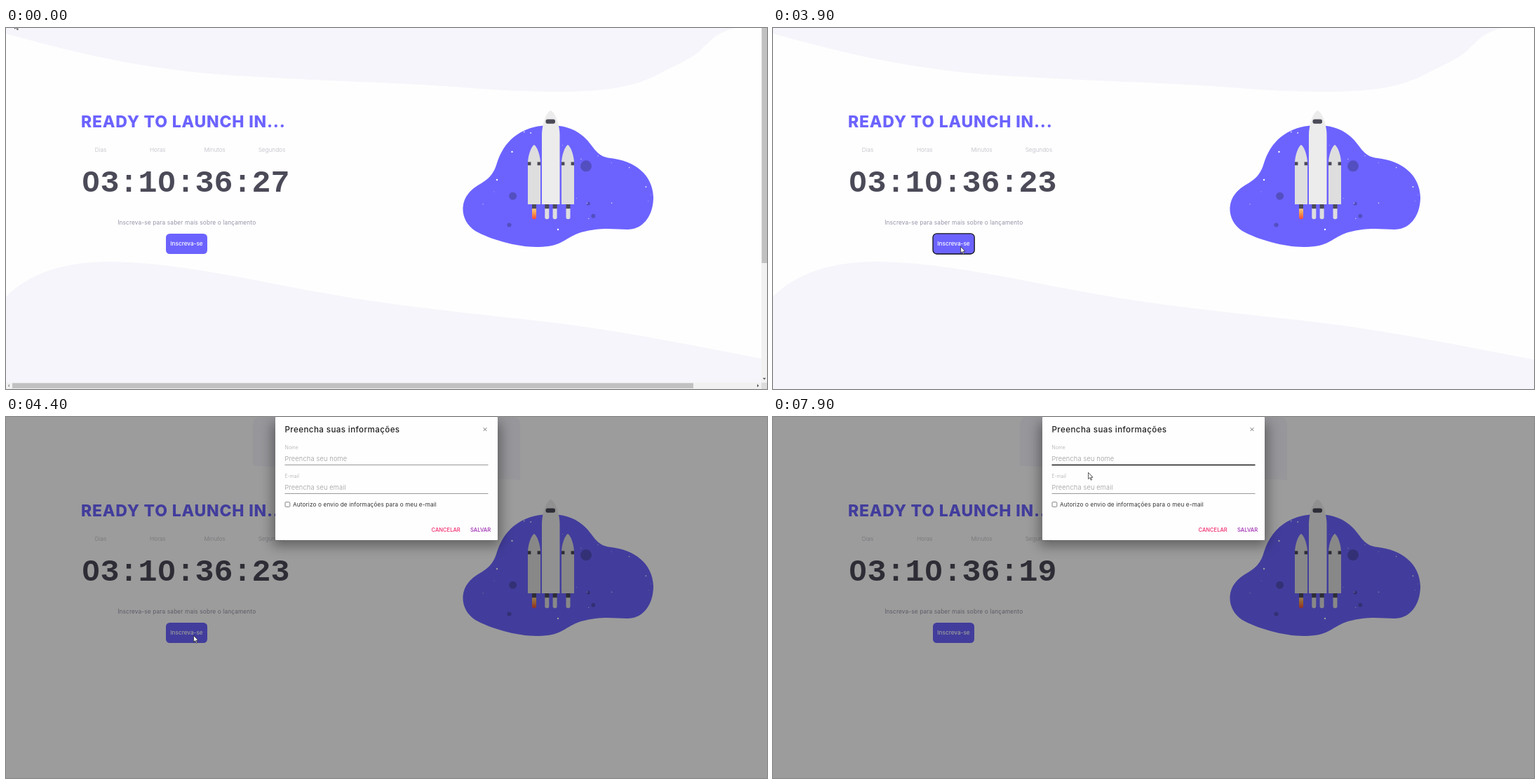
An HTML page that plays this animation: 1085 px wide and 516 px high, repeating every 8000 ms.

```html
<!DOCTYPE html>
<html lang="pt-BR">
<head>
<meta charset="utf-8">
<title>Contagem regressiva</title>
<style>
html, body { margin: 0; width: 100%; height: 100%; overflow: hidden; background: #fefefe; }
svg { display: block; width: 100%; height: 100%; }
text { font-family: Inter, "Open Sans", sans-serif; font-optical-sizing: none; white-space: pre; }
.title { font-size: 23px; font-weight: 800; letter-spacing: .8px; fill: #6c63ff; }
.unit { font-size: 8.2px; font-weight: 300; fill: #b9b8c2; text-anchor: middle; }
.clock { font: 700 45px "Liberation Mono", monospace; fill: #4b4a58; }
.note { font-size: 8.3px; letter-spacing: .13px; fill: #9594a8; text-anchor: middle; }
.button { font-size: 8.2px; font-weight: 500; fill: #fff; text-anchor: middle; }
.head { font-size: 11.6px; font-weight: 500; letter-spacing: .4px; fill: #222; }
.label { font-size: 6.9px; font-weight: 300; fill: #aaa; }
.hint { font-size: 9.2px; font-weight: 300; letter-spacing: .2px; fill: #999; }
.check { font-size: 8.2px; letter-spacing: .14px; fill: #333; }
.action { font-size: 7.6px; font-weight: 500; }
</style>
</head>
<body>
<svg viewBox="0 0 1085 516">
  <defs>
    <linearGradient id="flame" x2="0" y2="1">
      <stop offset="0" stop-color="#f8d98c"/>
      <stop offset=".5" stop-color="#f79a4d"/>
      <stop offset="1" stop-color="#f0483a"/>
    </linearGradient>
    <filter id="blur" x="-20%" y="-30%" width="140%" height="160%">
      <feGaussianBlur stdDeviation="9"/>
    </filter>
    <clipPath id="haloClip"><rect x="352" width="381" height="100" rx="10"/></clipPath>
    <path id="topWave" d="M0 8C100 36 190 57 300 66C420 75 540 77 640 84C700 89 740 91 790 91C850 91 895 85 930 66C955 53 975 45 988 34C1002 21 1012 6 1040 0H0Z"/>
    <path id="cloud" d="M776 139C738 139 711 158 700 193C692 222 672 220 659 237C646 253 650 278 669 290C690 302 728 313 756 313C795 313 795 300 820 292C850 284 868 288 886 288C910 288 923 266 923 242C922 209 896 190 862 186C840 184 838 167 822 154C808 142 790 139 776 139Z"/>
    <clipPath id="inCloud"><use href="#cloud"/></clipPath>
    <g id="booster">
      <path fill="#dedede" d="M-9 252V194C-9 182 -4 169 0 167C4 169 9 182 9 194V252Z"/>
      <path fill="#4a4a58" d="M-9 191.5h4.4v4.8h-4.4ZM4.6 191.5H9v4.8H4.6Z"/>
    </g>
  </defs>

  <rect width="1085" height="516" fill="#fefefe"/>
  <g id="waves" fill="#f5f5fb">
    <use href="#topWave"/>
    <path d="M0 384C36 348 88 333 155 334C265 337 375 367 500 387C625 406 720 413 810 425C915 440 1000 458 1085 474V516H0Z"/>
  </g>

  <text class="title" x="107" y="142">READY TO LAUNCH IN...</text>
  <g id="units"></g>
  <text class="clock" id="clock" x="107.5" y="234"></text>
  <g id="zeros" fill="#fefefe"></g>
  <text class="note" x="257.7" y="280.5">Inscreva-se para saber mais sobre o lançamento</text>
  <rect x="228" y="294" width="59" height="29" rx="5.5" fill="#6c63ff"/>
  <rect id="ring" x="228" y="293.8" width="59.2" height="29.2" rx="5.5" fill="none" stroke="#101014" stroke-width="1.3"/>
  <text class="button" x="257.5" y="311">Inscreva-se</text>

  <use href="#cloud" fill="#6c63ff"/>
  <g id="planets" fill="#544fc0"></g>
  <g id="stars" fill="#fff" clip-path="url(#inCloud)"></g>
  <g id="jets"></g>
  <use href="#booster" x="753"/>
  <use href="#booster" x="801"/>
  <path fill="#ececec" d="M764 252V153C764 139 770 120 776.5 118C783 120 789.5 139 789.5 153V252Z"/>
  <rect x="769.5" y="130.5" width="13.5" height="6.2" rx="2.6" fill="#4a4a58"/>

  <g id="bars">
    <path fill="#f1f1f1" d="M1077 0h8v507h-8ZM0 507h1077v9H0Z"/>
    <path fill="#dcdcdc" d="M1077 507h8v9h-8Z"/>
    <path fill="#c1c1c1" d="M1077.5 0h7.5v336h-7.5ZM9 507.5h971v7.5H9Z"/>
    <path fill="#505050" d="M1079 500.3h4.4l-2.2 2.4ZM1071 509v4.4l2.4-2.2Z"/>
    <path fill="#a0a0a0" d="M5 509v4.4l-2.4-2.2Z"/>
  </g>

  <rect id="dim" width="1085" height="516"/>

  <g id="modal">
    <use href="#topWave" fill="#8e8e98" opacity=".4" clip-path="url(#haloClip)"/>
    <g id="sheet">
      <rect x="380" y="8" width="325" height="176" opacity=".38" filter="url(#blur)"/>
      <rect x="384" width="317" height="176" rx="1" fill="#fefefe"/>
      <text class="head" x="397.5" y="22">Preencha suas informações</text>
      <path stroke="#777" d="M680.6 15.2l4.8 4.8m0 -4.8l-4.8 4.8"/>
      <text class="label" x="397.5" y="46">Nome</text>
      <text class="hint" x="397.5" y="62.6">Preencha seu nome</text>
      <rect id="nameLine" x="397.5" width="290"/>
      <text class="label" x="397.5" y="87">E-mail</text>
      <text class="hint" x="397.5" y="103.5">Preencha seu email</text>
      <rect x="397.5" y="109" width="290" height="1" fill="#999"/>
      <rect x="398" y="121.6" width="6.8" height="6.8" rx="1.2" fill="none" stroke="#666" stroke-width=".8"/>
      <text class="check" x="409" y="128">Autorizo o envio de informações para o meu e-mail</text>
      <text class="action" x="606.5" y="164" fill="#f02a6b">CANCELAR</text>
      <text class="action" x="662" y="164" fill="#9c27b0">SALVAR</text>
    </g>
  </g>

  <path id="cursor" fill="#fff" stroke="#1c1c1c" stroke-width=".75" stroke-linejoin="round" d="M.4 .4V9.6L2.5 7.7L4 11.2L5.4 10.6L3.9 7.2H6.8Z"/>
</svg>

<script>
const LOOP = 8000, STEP = 100;
const $ = id => document.getElementById(id);

function make(tag, attrs, text = '') {
  const el = document.createElementNS('http://www.w3.org/2000/svg', tag);
  for (const k in attrs) el.setAttribute(k, attrs[k]);
  el.textContent = text;
  return el;
}
const add = (parent, ...spec) => $(parent).appendChild(make(...spec));
const dot = (parent, cx, cy, r) => add(parent, 'circle', { cx, cy, r });

function seeded(seed) {
  return () => (seed = seed * 16807 % 2147483647) / 2147483647;
}

['Dias', 'Horas', 'Minutos', 'Segundos'].forEach((name, i) =>
  add('units', 'text', { class: 'unit', x: 135 + 81.3 * i, y: 176.8 }, name));

dot('planets', 827, 197.3, 8);
dot('planets', 722.6, 240.2, 5.5);
dot('planets', 717.5, 281.5, 3.1);
dot('planets', 837.3, 268.7, 3);
dot('planets', 830.3, 251, 2.6);

// three bright stars, the rest scattered
dot('stars', 721.5, 177, 1.2);
dot('stars', 700, 217, 1.2);
dot('stars', 787, 288, 1.2);
const rnd = seeded(77);
for (let i = 0; i < 20; i++)
  dot('stars', 655 + 265 * rnd(), 145 + 155 * rnd(), .4 + .5 * rnd());

[753, 771.3, 782.6, 801.5].forEach((x, i) => {
  add('jets', 'rect', { x: x - 3, y: 256, width: 6, height: 17.3, rx: 2.8, fill: i ? '#dedede' : 'url(#flame)' });
  add('jets', 'rect', { x: x - 3, y: 252, width: 6, height: 6.2, fill: '#4a4a58' });
});

// pointer strokes; over text the pointer is gone until the next one
const glide = (from, to, d, gone = false) => {
  const path = make('path', { d });
  return { from, to, gone, path, length: path.getTotalLength() };
};
const glides = [
  glide(200, 1300, 'M12 -8.5C540 250 680 440 243 336'),
  glide(1400, 1600, 'M243 336L145 236', true),
  glide(1800, 2100, 'M103 191L97 197'),
  glide(2200, 2600, 'M97 197Q130 400 300 447'),
  glide(2700, 3600, 'M300 447C190 400 190 310 267.2 312'),
  glide(4500, 4800, 'M267.2 312L458 248'),
  glide(5050, 6300, 'M458 248C500 250 530 200 583 192'),
  glide(6400, 7000, 'M583 192C690 230 660 150 560 123', true),
  glide(7700, 7900, 'M477 41L449.2 79')
];

function drawCursor(t) {
  const g = glides.filter(g => t > g.from).pop() || glides[0];
  const p = Math.min(1, Math.max(0, (t - g.from) / (g.to - g.from)));
  const { x, y } = g.path.getPointAtLength(g.length * p);
  show('cursor', !(g.gone && t > g.to));
  $('cursor').setAttribute('transform', `translate(${x} ${y})`);
}

const show = (id, on) => $(id).setAttribute('visibility', on ? 'visible' : 'hidden');
let shown = '';

function drawClock(time) {
  if (time === shown) return;
  shown = time;
  $('clock').textContent = time;
  // plain, undotted zeros
  $('zeros').replaceChildren();
  [...time].forEach((c, i) => {
    if (c === '0') add('zeros', 'ellipse', { cx: 121 + 27 * i, cy: 219.2, rx: 4.6, ry: 8 });
  });
}

function drawModal(t) {
  const rest = Math.max(0, (4400 - t) / 200) ** 1.6;
  show('modal', t >= 4200);
  $('sheet').setAttribute('opacity', Math.max(0, 1 - .72 * rest));
  $('modal').setAttribute('transform',
    `translate(542.5 88) scale(${1 - .095 * rest}) translate(-542.5 -88)`);

  const focus = t >= 7300, line = $('nameLine');
  line.setAttribute('y', focus ? 67.8 : 68);
  line.setAttribute('height', focus ? 1.5 : 1);
  line.setAttribute('fill', focus ? '#1c1c1c' : '#999');
}

function draw(time) {
  const t = Math.floor(time / STEP) * STEP;
  const dim = t < 4100 ? 0 : t < 4200 ? .26 : .39;
  show('bars', t < 3900);
  show('waves', !dim);
  show('ring', t >= 3900 && t < 4300);
  $('dim').setAttribute('opacity', dim);
  drawClock('03:10:36:' + (27 - Math.floor((t + 400) / 1000)));
  drawModal(t);
  drawCursor(t);
}

const start = performance.now();
function tick() {
  draw((performance.now() - start) % LOOP);
  requestAnimationFrame(tick);
}
tick();
</script>
</body>
</html>
```
